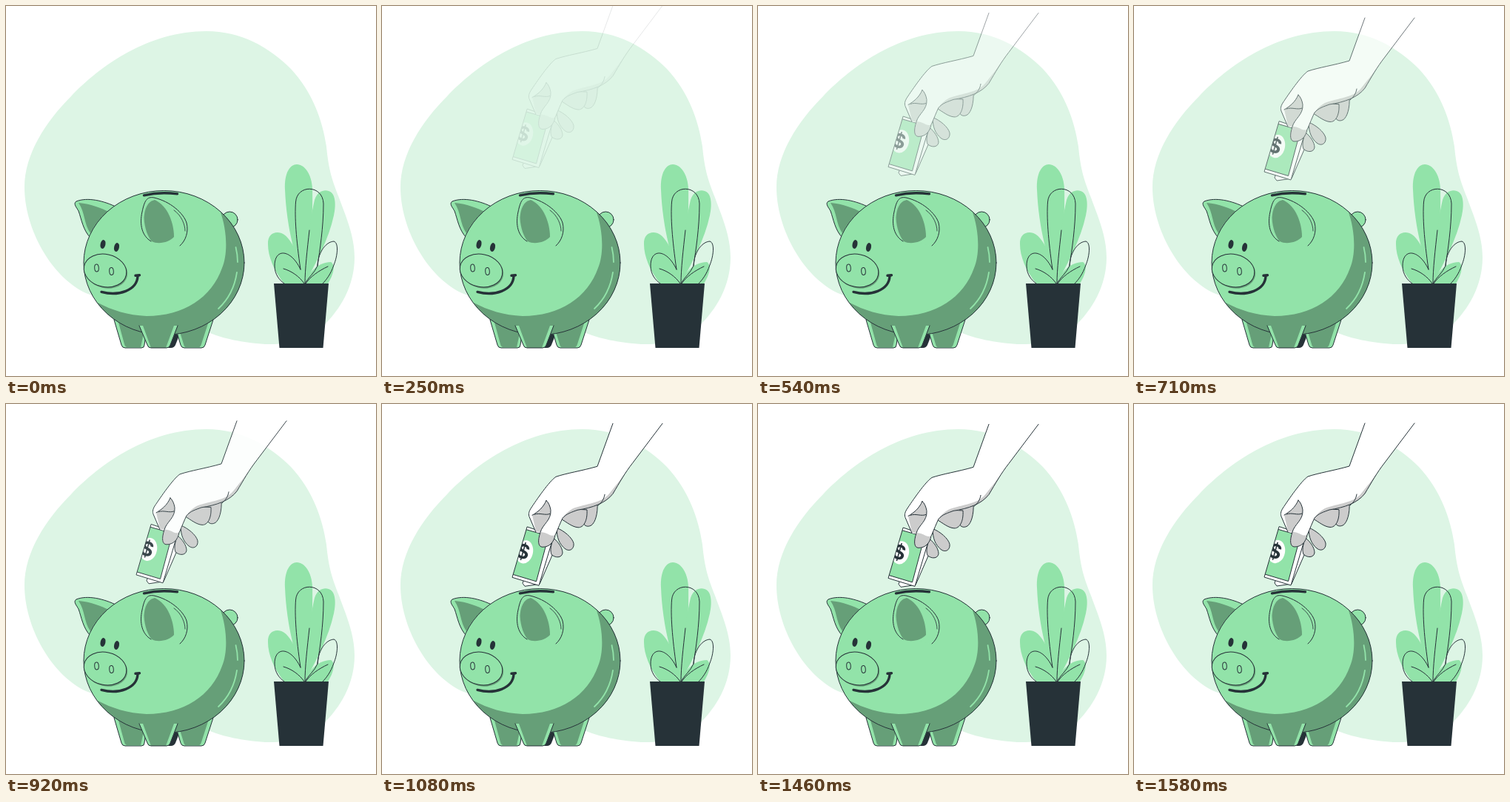
An HTML page for the animation above (1620 ms loop, 500 by 500 pixels).

```html
<!DOCTYPE html>
<html lang="en">
<head>
<meta charset="utf-8">
<title>Piggy bank</title>
<style>
  html, body { margin: 0; width: 100%; height: 100%; overflow: hidden; background: #fff; }
  svg { display: block; width: 100%; height: 100%; }
  .line { fill: none; }
  .ink { fill: #263238; }
  .mint { fill: #92e3a9; }
  .shade { fill: #669f78; }
  .skin { fill: #fff; }
  .dim { fill: #ccc; }
  .o, .line { stroke: #263238; stroke-width: 1; stroke-linejoin: round; stroke-linecap: round; }
  .thick { stroke-width: 3.4; }
  .shine { fill: none; stroke: #92e3a9; stroke-width: 1.8; stroke-linecap: round; }
  #hand { opacity: 0; }
</style>
</head>
<body>
<svg viewBox="0 0 500 500">
  <defs>
    <clipPath id="belly"><ellipse cx="213.5" cy="347" rx="108.5" ry="97.5"/></clipPath>
    <clipPath id="note"><path d="M196 166L176 234L212 245L232 178Z"/></clipPath>
  </defs>

  <path fill="#ddf5e5" d="M271 34C317 34 355 55 385 85C414 116 428 155 433 190C436 222 441 236 450 259C459 284 471 310 471 340C471 378 452 410 428 433C408 453 380 458 350 457C320 455 292 449 276 442C230 424 160 408 108 388C60 365 25 300 25 245C25 200 54 156 88 122C128 80 193 34 271 34Z"/>

  <g id="plant">
    <g class="mint">
      <path d="M404 375C392 345 379 300 377 248C376 225 384 214 393 214C404 214 413 228 414 246C415 290 411 340 404 375Z"/>
      <path d="M404 375C406 345 408 300 417 262C421 250 430 248 436 250C446 253 446 270 443 283C436 315 420 345 404 375Z"/>
      <path d="M404 375H376C362 358 354 338 354 322C353 305 368 303 376 309C388 318 397 340 404 375Z"/>
      <path d="M405 375C408 360 422 346 439 346C446 350 442 364 435 375Z"/>
    </g>
    <g class="line">
      <path d="M398 356C392 315 390 285 391.500 265C393 241 428 241 429 267C429 300 424 330 421 351C417 361 408 367 404 375"/>
      <path d="M398 356C385 328 363 327 363 351C363 363 370 371 376 375"/>
      <path d="M410 303C407 330 404 355 404 375M403 375C397 366 386 358 375 355"/>
      <path d="M421 351C421 337 430 319 443 318C450 320 448 338 443 350C439 362 433 370 428 375M435 352C422 358 411 366 405 375"/>
    </g>
    <path class="ink" d="M362 375H436L428.500 462H369.500Z"/>
  </g>

  <g id="pig">
    <g id="hind">
      <path class="ink" d="M219 462L229 440H236L229 458Q227 462 223 462Z"/>
      <path class="o mint" d="M146 424L156 458Q157 462 161 462H183Q187 462 187 458L192 424Z"/>
      <path class="shade" d="M151 424L160 457Q161 461.300 165 461.300H182L190 424Z"/>
      <path class="o mint" d="M230 438L236 458Q237 462 241 462H264Q268 462 269 458L280 424Z"/>
      <path class="shade" d="M233 434L240 457Q241 461.300 244 461.300H260Q263 461 264 457L274 426Z"/>
    </g>
    <circle class="o mint" cx="302.300" cy="288.800" r="10.800"/>
    <path class="o mint" d="M150 272C132 263 110 258 95 264C90 267 96 273 98 277C102 288 104 303 114 313Z"/>
    <path class="shade" d="M98 266C115 267 130 274 139 278C128 285 120 295 114 307C105 294 107 279 98 266Z"/>

    <ellipse class="mint" cx="213.500" cy="347" rx="108.500" ry="97.500"/>
    <path class="shade" clip-path="url(#belly)" d="M289 276C299 303 300 335 292 354C278 394 240 419 190 419C165 418 143 411 124 401L100 460H340V276Z"/>
    <ellipse class="line" cx="213.500" cy="347" rx="108.500" ry="97.500"/>
    <path class="shine" d="M287 409C301 396 309 380 312 360M313 346C313 340 312 332 310.500 326"/>

    <path class="shade" d="M180 431H233L222 458Q221 462 217 462H196Q192 462 191 458Z"/>
    <path class="mint" d="M180 432L191 458Q192 462 196 462L185 432ZM232 432L222 458Q221 462 216 462L227 432Z"/>
    <path class="line" d="M180 432L191 458Q192 462 196 462H217Q221 462 222 458L232 432"/>

    <path class="line thick" d="M186.500 255.800C200 252.600 217 252 231.500 253.900"/>

    <path class="mint" d="M196 318C184 311 180 296 184 278C187 264 190 257 200 259C222 264 240 280 244 293C247 305 243 317 235 324Z"/>
    <path class="shade" d="M201 262C191 264 187 275 186.500 286C187 300 192 313 197 318C206 323 221 319 227 312C227 294 219 270 201 262Z"/>
    <path class="line" d="M196 318C184 311 180 296 184 278C187 264 190 257 200 259C222 264 240 280 244 293C247 305 243 317 235 324"/>
    <path class="line" stroke-opacity=".8" d="M227 276C237 283 242 295 242 304"/>

    <ellipse class="ink" cx="131" cy="322" rx="3.400" ry="6" transform="rotate(12 131 322)"/>
    <ellipse class="ink" cx="149.500" cy="326" rx="3.400" ry="6" transform="rotate(12 149.500 326)"/>
    <ellipse class="shade" cx="135.500" cy="359" rx="29" ry="22.500" transform="rotate(12 135.500 359)"/>
    <ellipse class="o mint" cx="134" cy="357.500" rx="29" ry="22" transform="rotate(12 134 357.500)"/>
    <ellipse class="line" cx="122.500" cy="354" rx="2.800" ry="5" transform="rotate(-4 122.500 354)"/>
    <ellipse class="line" cx="142.500" cy="358.500" rx="2.800" ry="5" transform="rotate(-4 142.500 358.500)"/>
    <path class="line thick" d="M129 386.400C152 392.500 177 384.500 178 365"/>
    <path class="line thick" d="M175 364.300L180.500 363.700"/>
  </g>

  <g id="hand">
    <path class="o dim" d="M291 133C292 148 288 160 283 163.500C277 167 272 164 270 156L262 140Z"/>
    <path class="o dim" d="M277 143C278 158 272 167 265 166.500C257 166 249 159 242 155L256 142Z"/>

    <path class="o skin" d="M212 180L190 242L193 246L213 243L237 188L226 176Z"/>
    <path class="o dim" d="M236 167C246 171 257 180 259 188C260 196 253 200 247 195C240 189 236 181 236 167Z"/>
    <path class="o dim" d="M232 181C238 186 244 194 244 201C243 208 234 208 229 203C227 198 228 190 232 181Z"/>

    <path class="skin" d="M196 166L176 234L212 245L232 178Z"/>
    <g clip-path="url(#note)">
      <path class="o mint" stroke-width=".7" d="M190 168L225 178L208.500 239.500L170 228Z"/>
      <ellipse class="skin" cx="192.500" cy="199.500" rx="11.500" ry="15.800" transform="rotate(12 192.500 199.500)"/>
      <text class="ink" x="190.500" y="208.500" transform="rotate(16 190.500 199)" text-anchor="middle" font-family="Inter, 'Liberation Sans', sans-serif" font-weight="700" font-size="27">$</text>
    </g>
    <path class="line" d="M196 166L176 234L212 245L232 178Z"/>

    <path class="skin" d="M312 26L291 84C270 90 250 93 235 98C226 104 209 129 201 141C198 146 198 149 199 152L208 173L214 174C210 185 211 193 217 193C226 193 232 187 234 177C238 168 241 160 244 154C249 148 256 146 264 143C284 140 302 134 312 121C321 106 328 93 339 79L379 26Z"/>
    <path class="dim" d="M339 79C328 93 321 106 312 121C302 134 284 140 264 143C256 146 249 148 244 154L240 164C243 153 249 146 258 141C276 134 297 134 307 121C316 110 324 100 339 79Z"/>
    <path class="dim" d="M222 130C218 140 210 146 203 150L208 172L214 173C217 162 227 157 228 146C228 138 226 134 222 130Z"/>
    <path class="dim" d="M214 173C209 184 210 193 217 193C226 193 232 187 234.500 176C229 181 223 172 214 173Z"/>
    <g class="line">
      <path d="M312 26L291 84C270 90 250 93 235 98C226 104 209 129 201 141C198 146 198 149 199 152L208 173"/>
      <path d="M379 26L339 79C328 93 321 106 312 121C302 134 284 140 264 143C256 146 249 148 244 154C241 160 238 168 234 177C232 187 226 193 217 193C211 193 210 185 214 173C217 162 229 157 228 143C227 137 225 133 222 130"/>
      <path d="M222 130C218 140 210 146 203 150M206 149C213 146 221 151 227 148M301 122C300 128 297 133 292 137"/>
    </g>
  </g>
</svg>
<script>
  const LOOP = 1620, STEPS = 39, FIRST = 5;

  const drop = document.getElementById('hand').animate([
    { opacity: 0, transform: 'translateY(-30px)' },
    { opacity: 1, transform: 'translateY(0px)' }
  ], { duration: LOOP, easing: 'cubic-bezier(.36,-.01,.5,1.38)', fill: 'both' });
  drop.pause();

  const start = performance.now();

  // The hand moves in 39 equal steps, on a 10 ms clock.
  function draw(now) {
    const t = Math.floor(Math.max(0, now - start) % LOOP / 10) * 10;
    const step = Math.floor(t * STEPS / LOOP);
    drop.currentTime = step < FIRST ? 0 : (step + 1) * LOOP / STEPS;
    requestAnimationFrame(draw);
  }
  draw(start);
</script>
</body>
</html>
```
